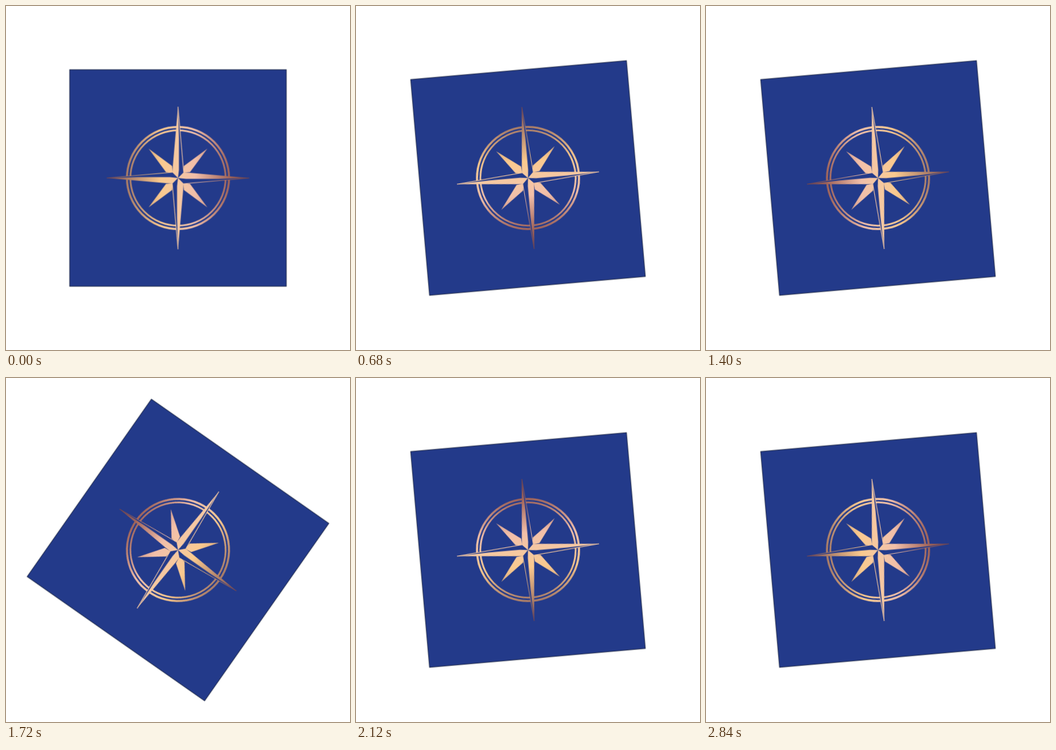
Animation of 603x603 px, one loop 2880 ms. Source, as an HTML page:

```html
<!DOCTYPE html>
<html lang="en">
<head>
<meta charset="utf-8">
<title>Turning compass</title>
<style>
  html, body { margin: 0; width: 100%; height: 100%; overflow: hidden; background: #fff; }
  svg { display: block; width: 100vw; height: 100vh; }
  .card { animation: turn 2880ms steps(72) infinite; transform-origin: 0 0; }
  @keyframes turn { to { transform: rotate(360deg); } }
  .metal { fill: url(#rose); }
  .ring, .edge { fill: none; stroke: url(#rose); }
  .edge { stroke-width: 1.2; }
  .ground { fill: #233a8a; }
</style>
</head>
<body>
<svg viewBox="-301.5 -301.5 603 603">
  <defs>
    <linearGradient id="rose" gradientUnits="userSpaceOnUse" x1="-125" y1="0" x2="125" y2="0">
      <stop offset="0" stop-color="#7d4444"/>
      <stop offset=".14" stop-color="#a97c67"/>
      <stop offset=".38" stop-color="#fac98e"/>
      <stop offset=".5" stop-color="#f5c8a2"/>
      <stop offset=".62" stop-color="#f2bfa9"/>
      <stop offset=".86" stop-color="#a0645a"/>
      <stop offset="1" stop-color="#7d4440"/>
    </linearGradient>
  </defs>
  <g class="card">
    <rect class="ground" x="-189.9" y="-189.9" width="379.8" height="379.8" stroke="#0c1738"/>
    <circle class="ring" r="89.5" stroke-width="3.5"/>
    <circle class="ring" r="83.5" stroke-width="3"/>
    <g id="star"></g>
  </g>
</svg>
<script>
  const star = document.getElementById('star');

  // Turns points by quarter turns, so the gradient stays fixed to the card.
  const quarter = (points, turns) => points.map(([x, y]) => {
    for (let i = 0; i < turns; i++) [x, y] = [-y, x];
    return [x, y];
  });

  function draw(className, points, tag = 'polygon') {
    for (let turns = 0; turns < 4; turns++) {
      const shape = document.createElementNS('http://www.w3.org/2000/svg', tag);
      shape.setAttribute('class', className);
      shape.setAttribute('points', quarter(points, turns).join(' '));
      star.append(shape);
    }
  }

  const tip = [0, -125];
  draw('metal', [[-51.5, -51.5], [-10.3, -21], [-9.7, -9.7], [-21, -10.3]]);
  draw('ground', [tip, [10, -10], [0, 0]]);
  draw('metal', [tip, [-10, -10], [0, 0], [1.6, -14], [1.6, -70]]);
  draw('edge', [tip, [10, -10]], 'polyline');
</script>
</body>
</html>
```
